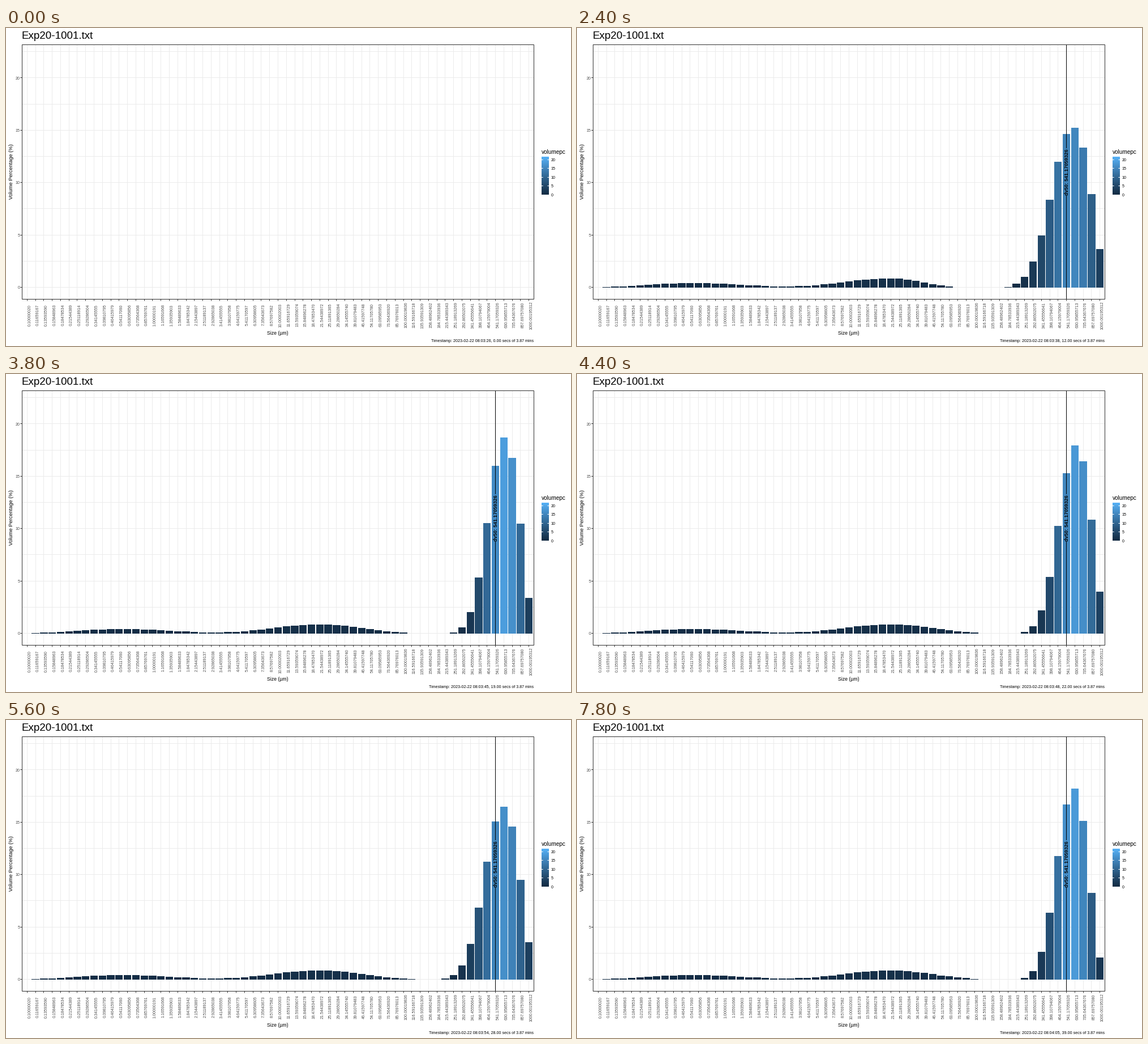
Write a matplotlib script that moves like this. It is 998 px wide and 561 px high and loops after 8000 ms.

```python
import numpy as np
import matplotlib.pyplot as plt
from matplotlib.animation import FuncAnimation
from matplotlib.patches import Rectangle

W, H, DPI = 998, 561, 64
PT = 72 / DPI                                   # points per pixel
LEFT, RIGHT, TOP, BOTTOM = 28.5, 932.5, 29.5, 478.5
STEP = (RIGHT - LEFT) / 61.2
ZERO, UNIT = 457.6, 18.49
VMAX = 21.6
FRAMES, INTERVAL = 40, 200
BLANK = {0, 13, 24, 36}                         # seconds without a reading
INK, GREY, GRID = "#333333", "#4d4d4d", "#ebebeb"

# Fifteen size classes per decade, stored in single precision.
IDX = np.arange(61)
SIZES = [f"{np.float32(1.00000196 * 10 ** (i / 15 - 1)):.8f}" for i in IDX]
MEDIAN = 56

# Key readings: second, coarse peak height, centre, steepness, fine tail steepness
READINGS = np.array([
    (7, 17.6, 57.0, .116, .019),
    (12, 15.4, 56.75, .080, .036),
    (19, 18.8, 57.1, .130, .019),
    (33, 15.3, 57.03, .085, .018),
    (39, 18.35, 56.84, .130, .020),
]).T
TIMES = READINGS[0]


def volumes(sec):
    peak, centre, steep, tail = (np.interp(sec, TIMES, row) for row in READINGS[1:])
    # the peak drifts a little between key readings
    centre += .12 * np.sin(2.4 * sec) * min(1, np.abs(TIMES - sec).min())
    d = IDX - centre
    coarse = peak * np.exp(-steep * d ** 2 * (1 + .065 * np.maximum(d, 0) ** 2))
    d = IDX - 35
    middle = .93 * np.exp(-np.where(d < 0, .0156, tail) * d ** 2)
    fine = .48 * np.exp(-(IDX - 11.5) ** 2 / 73)
    return np.maximum(coarse + middle + fine - .07, 0)


# Colour ramp, mixed in CIE Lab.
TO_XYZ = np.array([[.4124, .3576, .1805], [.2126, .7152, .0722], [.0193, .1192, .9505]])
WHITE = TO_XYZ.sum(axis=1)
TO_LAB = np.array([[0, 116, 0], [500, -500, 0], [0, 200, -200]])


def to_lab(rgb):
    c = np.array(rgb) / 255
    xyz = TO_XYZ @ np.where(c > .04045, ((c + .055) / 1.055) ** 2.4, c / 12.92) / WHITE
    f = np.where(xyz > .008856, np.cbrt(xyz), 7.787 * xyz + 16 / 116)
    return TO_LAB @ f


LOW, HIGH = to_lab((19, 43, 67)), to_lab((86, 177, 247))


def ramp(v):
    t = np.clip(v / VMAX, 0, 1)[..., None]
    f = (LOW + (HIGH - LOW) * t) @ np.linalg.inv(TO_LAB).T
    xyz = np.where(f > .2069, f ** 3, (f - 16 / 116) / 7.787) * WHITE
    c = np.clip(xyz @ np.linalg.inv(TO_XYZ).T, 0, 1)
    return np.clip(np.where(c > .0031308, 1.055 * c ** (1 / 2.4) - .055, 12.92 * c), 0, 1)


def x_at(i):
    return LEFT + (0.6 + i) * STEP


def y_at(v):
    return ZERO - UNIT * v


fig = plt.figure(figsize=(W / DPI, H / DPI), dpi=DPI, facecolor="white")
ax = fig.add_axes([0, 0, 1, 1])
ax.axis("off")


def text(x, y, s, size, color="black", ha="left", rot=0, **kw):
    return ax.text(x, y, s, fontsize=size * PT, color=color, ha=ha, va="baseline",
                   rotation=rot, rotation_mode="anchor", family="Liberation Sans", **kw)


def line(xs, ys, color, z):
    return ax.plot(xs, ys, color=color, lw=PT, zorder=z, snap=False,
                   solid_capstyle="butt")[0]


# One-pixel lines, centred on the pixel they fall in
def hline(y, x0, x1, color, z=1):
    return line([x0, x1], [np.floor(y) + .5] * 2, color, z)


def vline(x, y0, y1, color, z=1):
    return line([np.floor(x) + .5] * 2, [y0, y1], color, z)


# Grid, axes and labels
for v in np.arange(0, 23, 2.5):
    y = y_at(v)
    hline(y, LEFT, RIGHT, GRID)
    if v % 5 == 0:
        hline(y, LEFT - 3, LEFT, INK)
        text(24.3, y + 2.7, f"{v:.0f}", 7.1, GREY, "right")
for i, size in enumerate(SIZES):
    x = x_at(i)
    vline(x, TOP, BOTTOM, GRID)
    vline(x, BOTTOM, BOTTOM + 3, INK)
    text(x + 6, 506.5, size, 7.1, GREY, "center", 90)
ax.add_patch(Rectangle((LEFT, TOP), RIGHT - LEFT, BOTTOM - TOP, fill=False,
                       ec=INK, lw=PT, zorder=5, snap=False))
text(28, 19, "Exp20-1001.txt", 18.7)
text(480, 541, "Size (µm)", 8.8, ha="center")
text(11.7, 253.5, "Volume Percentage (%)", 9.3, ha="center", rot=90)
caption = text(932.5, 554, "", 7.18, ha="right")

# Legend
text(946, 222.3, "volumepc", 10)
ax.imshow(ramp(np.linspace(0, VMAX, 80))[:, None, :], extent=(946, 959, 294, 227),
          origin="lower", aspect="auto", interpolation="bilinear")
for v in range(0, 21, 5):
    y = 294 - 3.1 * v
    hline(y, 946, 948.6, "white", 3)
    hline(y, 956.4, 959, "white", 3)
    text(963, y + 2.7, str(v), 7.1)

# Bars and the median marker
bars = [ax.add_patch(Rectangle((x_at(i) - .45 * STEP, ZERO), .9 * STEP, 0, lw=0, zorder=2))
        for i in IDX]
mid = x_at(MEDIAN)
marker = [vline(mid, TOP, 212, "black", 4),
          vline(mid, 296, BOTTOM, "black", 4),
          text(mid + 3.2, 254, "dv50: " + SIZES[MEDIAN], 8.7, ha="center", rot=90,
               weight="bold", zorder=4)]

ax.set_xlim(0, W)
ax.set_ylim(H, 0)


def update(sec):
    shown = sec not in BLANK
    vals = volumes(sec)
    for bar, v, c in zip(bars, vals, ramp(vals)):
        bar.set_height(-UNIT * v)
        bar.set_facecolor(c)
        bar.set_visible(shown and v > .03)
    for part in marker:
        part.set_visible(shown)
    minute, second = divmod(3 * 60 + 26 + sec, 60)
    caption.set_text(f"Timestamp: 2023-02-22 08:{minute:02d}:{second:02d}, "
                     f"{sec:.2f} secs of 3.87 mins")
    return [*bars, *marker, caption]


anim = FuncAnimation(fig, update, frames=FRAMES, interval=INTERVAL,
                     init_func=lambda: update(0), repeat=True, repeat_delay=0, blit=False)
plt.show()
```
